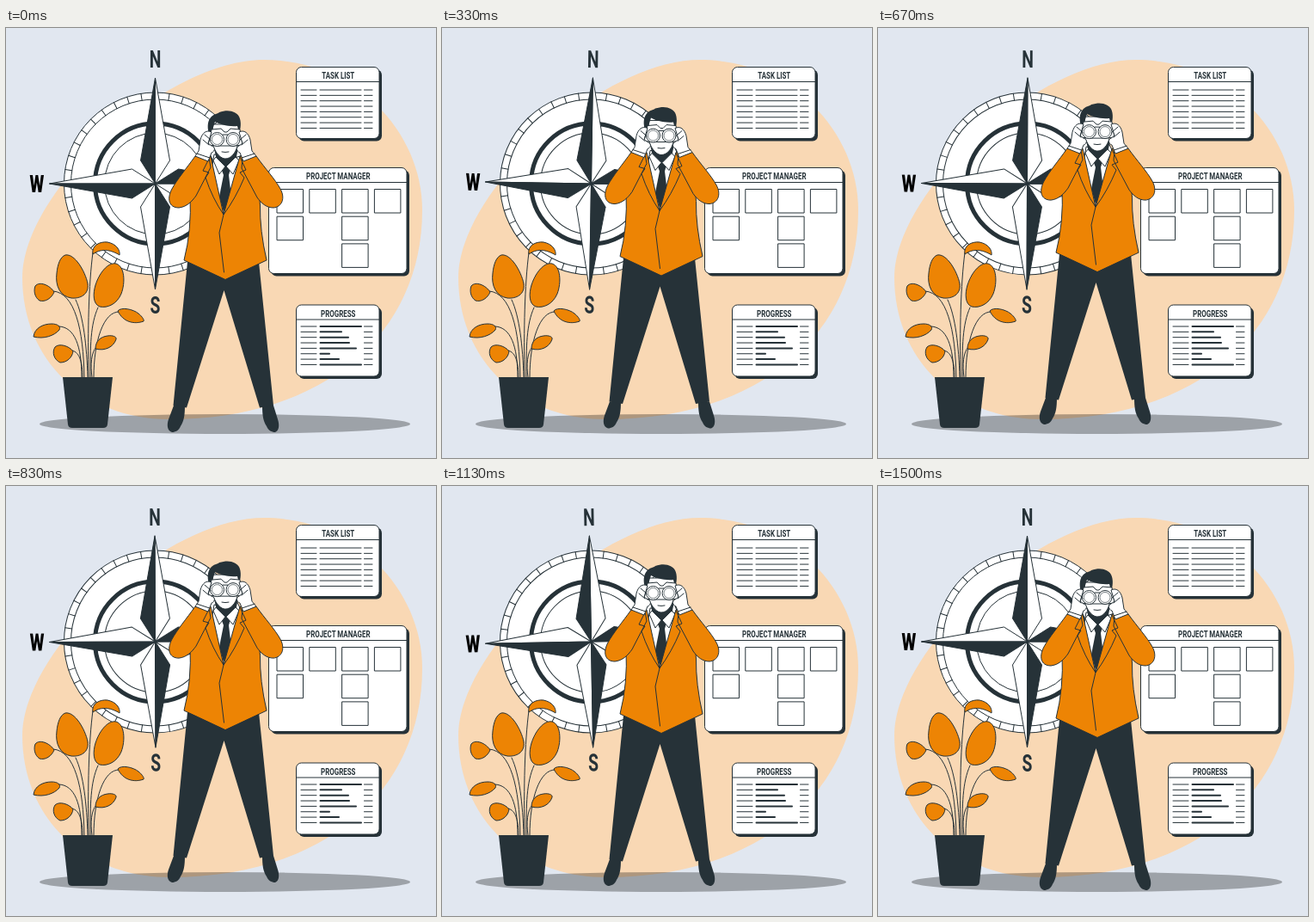
An HTML page for the animation above (1540 ms loop, 500 px wide and 500 px high).

```html
<!DOCTYPE html>
<html lang="en">
<head>
<meta charset="utf-8">
<title>Project lookout</title>
<style>
  html, body { margin: 0; height: 100%; overflow: hidden; background: #e1e7f0; }
  svg { display: block; width: 100%; height: 100%; }
  text { font: 700 11.5px Roboto, sans-serif; text-anchor: middle; fill: #263238; }
  .big { font-size: 28px; }
  .heavy { font-weight: 900; fill: #000; }
  .line { fill: none; stroke: #263238; stroke-linecap: round; stroke-linejoin: round; }
  .white { fill: #fff; stroke: #263238; stroke-linejoin: round; }
  .orange { fill: #ed8404; stroke: #263238; stroke-linejoin: round; }
  .dark { fill: #263238; }
</style>
</head>
<body>
<svg viewBox="0 0 500 500">
  <path fill="#f9d8b4" d="M300 37C405 37 484 120 484 212C484 355 370 455 190 455C90 455 19 385 19 290C19 190 185 37 300 37Z"/>
  <ellipse cx="254.500" cy="460.500" rx="215.500" ry="11.500" opacity=".3"/>
  <g id="compass"></g>
  <g id="panels"></g>

  <g id="plant">
    <g class="line">
      <path d="M96 406C95 350 96 300 101 261M95 406C94 370 90 335 81 316M98 406C98 370 98 345 107 325
        M91 406C90 350 80 308 55 306M88 406C88 370 80 348 62 347M89 406C89 390 86 377 77 375
        M100 406C98 392 99 377 105 371M102 406C102 365 113 329 132 330"/>
    </g>
    <g class="orange">
      <path d="M101 263C99 253 109 248 118 249C128 251 133 258 132 264C124 259 112 255 101 263Z"/>
      <path d="M69 264C80 262 92 283 95 297C97 310 86 315 76 314C63 312 57 300 59 285C60 275 63 266 69 264Z"/>
      <path d="M128 274C138 277 139 296 134 309C129 321 118 326 109 324C101 321 101 309 104 299C108 286 118 272 128 274Z"/>
      <path d="M34 300C39 294 51 299 56 307C53 314 46 319 39 317C33 313 32 305 34 300Z"/>
      <path d="M32 359C33 349 43 344 53 344C60 344 64 347 62 351C56 358 44 362 32 359Z"/>
      <path d="M57 371C62 366 74 370 78 376C77 383 71 389 63 389C56 386 53 377 57 371Z"/>
      <path d="M104 373C104 364 110 359 118 358C124 357 129 359 128 362C125 371 115 376 104 373Z"/>
      <path d="M130 329C134 324 148 327 154 332C159 336 161 340 160 341C149 345 136 342 130 329Z"/>
    </g>
    <path class="dark" d="M66 406H124L118 461Q117.500 465 113 465H77Q72.500 465 72 461Z"/>
  </g>

  <g id="man">
    <g class="dark">
      <path d="M195 439H208C208 450 207 457 203 463C201 468 197 470 193 470C187 468 187 461 189 455Z"/>
      <path d="M311 439H298C298 450 299 457 303 463C305 468 309 470 313 470C318 468 318 461 316 455Z"/>
      <path d="M211 272L194.500 439L210 441.500L253.500 305L295 441.500L311 439L294 272Z"/>
    </g>

    <path class="white" d="M242 147L239 165L253 217L271 165L267 147Z"/>
    <path class="dark" d="M250 163L255 160L261 164L259 171L262 196L253 214L248 196L253 171Z"/>
    <path class="dark" d="M242 140H270L267 154L256 163L245 154Z"/>
    <path class="white" d="M244 150L255 161L248 170L241 154ZM267 150L256 161L264 170L271 154Z"/>

    <path class="orange" d="M238 149L253 217L272 149L291 153L295.500 206Q295 235 303 270L255 292.500L207 270Q216 235 214 195L221 150Z"/>
    <path class="orange" d="M220 149C210 163 199 176 193 187C187 198 189 209 201 209C210 208 216 202 221 195L238 162L236 151Z"/>
    <path class="orange" d="M291 149C301 163 313 176 319 187C325 198 321 208 311 209C303 209 297 204 292 197L274 163L275 151Z"/>
    <path class="line" d="M237 150L229 166L236 168L232 174Q240 198 253 217Q267 198 277 174L272 168L279 165L272 150
      M253 217L248 238L253.500 284"/>

    <path class="white" d="M240 112L241 137C244 146 250 152 255 152C261 152 267 146 269 137L271 112Z"/>
    <path class="line" d="M251 144Q255 145 259 144"/>
    <path class="dark" d="M236 123C234 116 234 109 238 104C241 100 246 100 248 98C260 94 268 98 271 103C274 109 273 117 271 123L269 114C258 115 249 112 243 109L239 122Z"/>

    <g class="white">
      <path d="M239 118L250 117L254 121H257L261 117L272 118L275 136L265 137H246L235 136Z"/>
      <circle cx="245.500" cy="129.500" r="8"/><circle cx="264" cy="129.500" r="8"/>
      <path d="M239 121C233 118 228 122 226 130L224 143L220 149L235 155L239 145C244 143 243 138 239 137L235 134Z"/>
      <path d="M271 121C277 118 282 122 284 130L286 143L291 149L276 155L272 145C267 143 268 138 271 137L275 134Z"/>
    </g>
    <g fill="#fff" stroke="#777f83">
      <circle cx="245.500" cy="129.500" r="6"/><circle cx="264" cy="129.500" r="6"/>
    </g>
    <path class="line" d="M231 124L238 130M229 130L236 136M279 124L272 130M281 130L274 136M222 146L237 151M289 146L274 151M252 124H258"/>
  </g>
</svg>
<script>
const byId = id => document.getElementById(id);
const compass = byId("compass"), panels = byId("panels"), man = byId("man");
const pivot = "173.5 181";

// Condensed lettering shared by all labels
const label = (text, x, y, cls = "") =>
  `<text class="${cls}" transform="translate(${x} ${y}) scale(.69 1)">${text}</text>`;
const rule = (x1, x2, y, width = 1) =>
  `<path class="line" stroke-width="${width}" d="M${x1} ${y}H${x2}"/>`;
const repeat = (count, draw) => Array.from({ length: count }, (_, i) => draw(i)).join("");

const ring = (r, width = 1, cls = "line") =>
  `<circle class="${cls}" r="${r}" stroke-width="${width}"/>`;
const needle = i => `<g transform="rotate(${i * 90})">
  <path class="white" d="M0 0L17 -27L0 -123Z"/>
  <path class="dark" stroke="#263238" stroke-linejoin="round" d="M0 0L-17 -27L0 -123Z"/></g>`;

compass.innerHTML = `<g transform="translate(173.5 181)">
  ${ring(106, 1, "white")}${ring(98)}
  ${repeat(40, i => `<path class="line" transform="rotate(${i * 9})" d="M0 -98V-106"/>`)}
  ${ring(70, 5)}${ring(59)}${repeat(4, needle)}</g>
  ${label("N", 173.5, 46, "big")}${label("S", 173.5, 331.5, "big")}${label("W", 36, 191, "big heavy")}`;

function panel(x, y, w, h, title, body) {
  const box = (dx, cls) =>
    `<rect class="${cls}" x="${x + dx}" y="${y + dx}" width="${w}" height="${h}" rx="6"/>`;
  return box(3, "dark") + box(0, "white") + rule(x, x + w, y + 17) +
    label(title, x + w / 2 + 0.5, y + 13.5) + body;
}

const rows = (top, middle) => repeat(8, i => {
  const y = top + i * 6.35;
  return rule(343, 361, y) + middle(i, y) + rule(416.5, 426, y);
});
const bars = [48, 25, 33, 34, 42, 11, 22, 48];
const cards = [[0, 0], [1, 0], [2, 0], [3, 0], [0, 1], [2, 1], [2, 2]];

panels.innerHTML =
  panel(337.5, 45.5, 96.5, 83, "TASK LIST", rows(72, (i, y) => rule(365, 413, y))) +
  panel(305.5, 162.5, 160.5, 123, "PROJECT MANAGER", cards.map(([col, row]) =>
    `<rect class="white" x="${315 + col * 37.8}" y="${187.5 + row * 31.7}" width="30.500" height="27.500"/>`).join("")) +
  panel(337.5, 322, 96.5, 83, "PROGRESS", rows(347, (i, y) => rule(365.5, 365 + bars[i], y, 2)));

// 24 steps per second; the 1.5 s cycle rests one extra step before looping
function draw(now) {
  const step = Math.floor((now % 1540 + 5) * 24 / 1000) % 37;
  const phase = step / 36;
  const lift = 10 * (1 - Math.abs(1 - 2 * phase));
  const sway = phase < 0.25 ? 4 * phase : phase < 0.75 ? 2 - 4 * phase : 4 * phase - 4;
  man.setAttribute("transform", `translate(0 ${-lift})`);
  compass.setAttribute("transform", `rotate(${sway} ${pivot})`);
  requestAnimationFrame(draw);
}
draw(performance.now());
</script>
</body>
</html>
```
